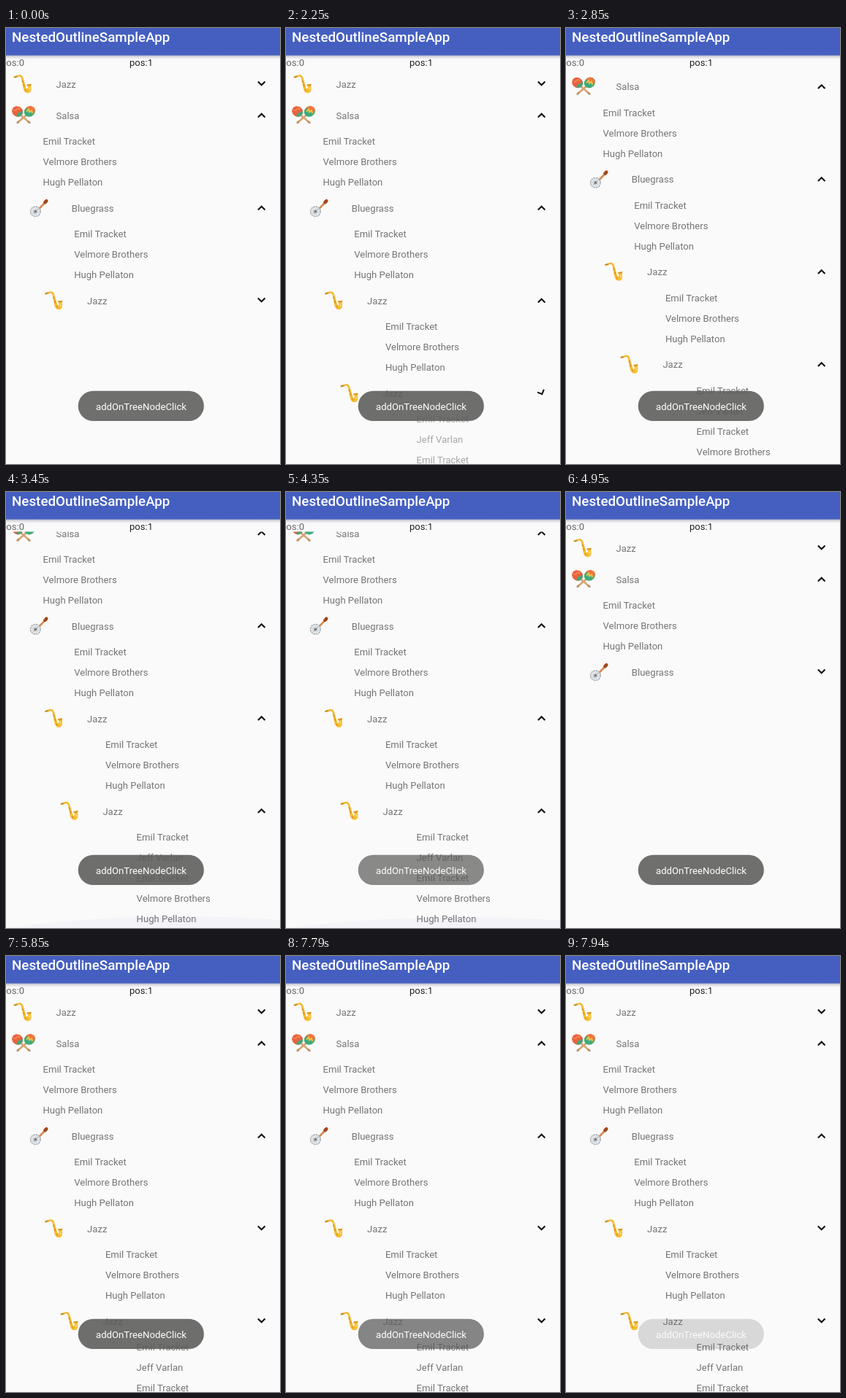
An HTML page for the animation above (8 s loop, 375 by 598 pixels).

```html
<!DOCTYPE html>
<html lang="en">
<head>
<meta charset="utf-8">
<title>Tree list</title>
<style>
  html, body { margin: 0; width: 100%; height: 100%; overflow: hidden; background: #fafafa; }
  svg { display: block; width: 100%; height: 100%; }
  text { font: 13.1px Roboto, "Noto Sans", sans-serif; fill: #757575; }
  .title { font-size: 18.8px; font-weight: 500; fill: #fff; }
  .label { fill: #222; }
  .toast { font-size: 13.2px; fill: #fff; text-anchor: middle; }
  .chevron { fill: none; stroke: #111; stroke-width: 2.1; }
</style>
</head>
<body>
<svg viewBox="0 0 375 598">
  <defs>
    <clipPath id="listArea"><rect y="54.5" width="375" height="544"/></clipPath>
    <linearGradient id="shade" x2="0" y2="1">
      <stop offset="0" stop-color="#a9adbc"/>
      <stop offset=".4" stop-color="#d9dae0"/>
      <stop offset="1" stop-color="#fafafa"/>
    </linearGradient>

    <g id="sax">
      <path d="M-13-8.6Q-11.5-10-8-10.2" fill="none" stroke="#c98a1b" stroke-width="2.2"/>
      <path d="M-9-10Q-3-13-2-8" fill="none" stroke="#f4b62c" stroke-width="2.4"/>
      <path d="M-3.3-9L-.8-9.2 3.2 4.5Q4.2 8 5.6 6.6 6.6 5.5 5.4 3L4.2 1.2 10.6.2Q9.8 3 10.5 7 10.4 12.8 5.4 12.8 1.2 12.6-.2 7Z" fill="#f8bd32"/>
      <path d="M4.2 1.2L10.6.2 10 2.4 5.2 2.8Z" fill="#d9921d"/>
      <path d="M-1.6-5L-.7-1.5M0 0L1 4M2 7.5L4.2 10" stroke="#c9851f" stroke-width="1.1"/>
      <path d="M8.2 4.5V8.5" stroke="#ffdc70" stroke-width="1.3"/>
    </g>

    <g id="maracas">
      <path d="M-5-1L9 11M5-1L-9 11" stroke="#d7a574" stroke-width="2.7"/>
      <path d="M6 8.5L9 11M-6 8.5L-9 11" stroke="#c1936a" stroke-width="2.7"/>
      <ellipse cx="-8.3" cy="-5" rx="7.8" ry="7" transform="rotate(35 -8.3 -5)" fill="#ea6142"/>
      <path d="M-9 2Q-2 2.6-.8-4L-2.5-7-5-3-8-3-10 1Z" fill="#41a878"/>
      <path d="M-14-7L-11-6-9-9-6-8-5-11" fill="none" stroke="#f08a4b" stroke-width="1.5"/>
      <ellipse cx="8.3" cy="-5" rx="7.8" ry="7" transform="rotate(-35 8.3 -5)" fill="#41a878"/>
      <path d="M3-9Q6-13 11-12.3 16-11 15.8-6L13-3 11-6 8-5 7-8Z" fill="#ee7440"/>
      <path d="M4-5L7-8 8-4 11-6.5 12-2" fill="none" stroke="#f6c443" stroke-width="1.8"/>
    </g>

    <g id="banjo">
      <path d="M-2 3.5L9-8" stroke="#d18a52" stroke-width="2.7"/>
      <path d="M8.2-7.4L10-9.4" stroke="#a3491f" stroke-width="4.6" stroke-linecap="round"/>
      <circle cx="-5" cy="5.2" r="6.8" fill="#e6eaed" stroke="#a3abb1" stroke-width="1.5" stroke-dasharray="2.6 1"/>
      <circle cx="-5" cy="5.2" r="4.4" fill="#d5dbdf"/>
      <circle cx="-5" cy="5.2" r="1.9" fill="#7d7772"/>
      <path d="M-8 8.4L-1 1.4" stroke="#94867c" stroke-width=".7"/>
    </g>
  </defs>

  <rect width="375" height="598" fill="#fafafa"/>
  <g clip-path="url(#listArea)"><g id="list"></g></g>
  <path id="glow" fill="#3f51b5" opacity=".03"/>

  <rect y="37" width="375" height="6" fill="url(#shade)"/>
  <rect width="375" height="37.5" fill="#455fc1"/>
  <text class="title" x="8" y="19">NestedOutlineSampleApp</text>
  <text class="label" x="-7" y="51.5" style="fill:#666">pos:0</text>
  <text class="label" x="169" y="51.5">pos:1</text>

  <g id="toast">
    <rect x="98.7" y="497.8" width="172.2" height="41.2" rx="20.6" fill="#5c5c5b" opacity=".88"/>
    <text class="toast" x="185" y="524">addOnTreeNodeClick</text>
  </g>
</svg>
<script>
const NS = 'http://www.w3.org/2000/svg';
const LOOP = 8000, NODE_H = 43, LEAF_H = 28;
const $ = id => document.getElementById(id);

function add(parent, tag, attrs = {}, text = '') {
  const el = document.createElementNS(NS, tag);
  for (const key in attrs) el.setAttribute(key, attrs[key]);
  el.textContent = text;
  parent.appendChild(el);
  return el;
}

let nextY = 55.5;

function addNode(group, name, icon, level) {
  const y = nextY + NODE_H / 2, shift = level * 21.3;
  add(group, 'use', { href: '#' + icon, x: 24 + shift, y: y - .5 });
  add(group, 'text', { x: 68.5 + shift, y: y + 5 }, name);
  const mount = add(group, 'g', { transform: `translate(349.7 ${y - .5})` });
  nextY += NODE_H;
  return add(mount, 'path', { class: 'chevron', d: 'M-4.8-3L0 1.8 4.8-3' });
}

function addLeaves(group, names, level) {
  for (const name of names) {
    add(group, 'text', { x: 50.5 + level * 42.7, y: nextY + LEAF_H / 2 + 4.8 }, name);
    nextY += LEAF_H;
  }
}

const [A, B, C, D] = ['Emil Tracket', 'Velmore Brothers', 'Hugh Pellaton', 'Jeff Varlan'];
const trio = [A, B, C];
const [first, base, inner, deep, deepest] = Array.from({ length: 5 }, () => add($('list'), 'g'));

addNode(first, 'Jazz', 'sax', 0);
const salsa = addNode(base, 'Salsa', 'maracas', 0);
addLeaves(base, trio, 0);
const bluegrass = addNode(base, 'Bluegrass', 'banjo', 1);
addLeaves(inner, trio, 1);
const jazz = addNode(inner, 'Jazz', 'sax', 2);
addLeaves(deep, trio, 2);
const lastJazz = addNode(deep, 'Jazz', 'sax', 3);
addLeaves(deepest, [A, D, A, B, C], 3);

// Eased 0..1 progress
function ramp(t, start, span) {
  const x = Math.min(1, Math.max(0, (t - start) / span));
  return (1 - Math.cos(Math.PI * x)) / 2;
}

const turn = (el, deg) => el.setAttribute('transform', `rotate(${deg})`);
const fade = (el, alpha) => el.setAttribute('opacity', alpha);

// The screen refreshes in 150 ms steps, with two late steps for the toast
function snap(t) {
  if (t >= 7940) return 7940;
  if (t >= 7790) return 7790;
  return Math.min(5850, Math.floor(t / 150) * 150);
}

function draw(t) {
  const early = t < 5000;

  const scroll = 63.4 * (ramp(t, 2711, 240) - ramp(t, 4569, 250));
  $('list').setAttribute('transform', `translate(0 ${-scroll})`);

  const open = early ? 1 - ramp(t, 4485, 90) : ramp(t, 5560, 120);
  fade(first, t < 3000 ? 1 : ramp(t, 4819, 120));
  fade(inner, open);
  fade(deep, open * ramp(t, 450, 120));
  fade(deepest, open * ramp(t, 2180, 120));

  turn(salsa, 180);
  turn(bluegrass, early ? 180 - 180 * ramp(t, 4415, 300) : -180 * ramp(t, 5500, 300));
  turn(jazz, early ? -180 * ramp(t, 450, 300) : 0);
  turn(lastJazz, early ? -180 * ramp(t, 2180, 300) : 0);

  const glowing = t >= 3150 && t < 4600;
  const height = glowing ? Math.max(15, 58 - (t - 3150) * .14) : 0;
  $('glow').setAttribute('d', `M0 598Q240 ${598 - 2 * height} 480 598Z`);

  const shown = Math.max(1 - ramp(t, 4250, 350), ramp(t, 4455, 400));
  fade($('toast'), shown * (1 - ramp(t, 7690, 370)));
}

const begin = performance.now();
function tick() {
  draw(snap((performance.now() - begin) % LOOP));
  requestAnimationFrame(tick);
}
tick();
</script>
</body>
</html>
```
